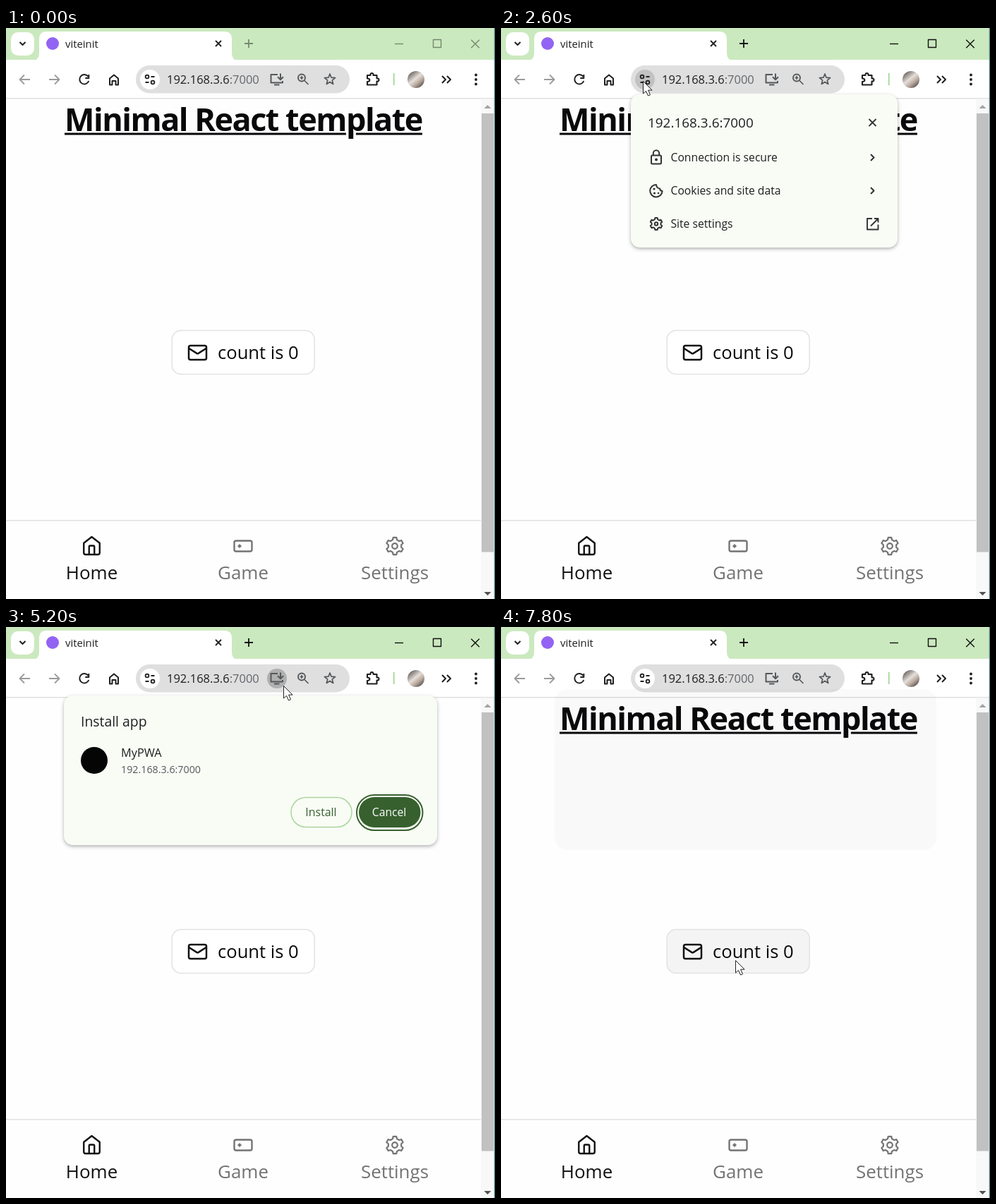
These frames come from a looping animation (693x809 px, 8000 ms). An HTML page with a canvas:

```html
<!DOCTYPE html>
<html lang="en">
<head>
<meta charset="utf-8">
<title>Minimal React template</title>
<style>
html, body { margin: 0; width: 100%; height: 100%; overflow: hidden; background: #fff; }
canvas { display: block; width: 693px; height: 809px; }
</style>
</head>
<body>
<canvas id="stage"></canvas>
<script>
const W = 693, H = 809, LOOP = 8000, STEP = 200;
const canvas = document.getElementById('stage');
const ctx = canvas.getContext('2d');
const dpr = window.devicePixelRatio || 1;
canvas.width = W * dpr;
canvas.height = H * dpr;

const INK = '#1f1f1f', GREEN = '#37602f', PANEL = '#f9fcf5', GREY = '#737373';
const HOST = '192.168.3.6:7000';

// [time, x, y] of the pointer tip
const POINTER = [
  [200, 660, 60], [400, 605, 85], [600, 375, 185], [800, 337, 208], [1000, 240, 140],
  [1200, 206, 80], [1600, 201, 75], [3800, 201, 75], [4600, 393, 83],
  [6200, 393, 83], [6400, 470, 200], [6600, 508, 250], [7200, 508, 250], [7800, 332, 472]
];

// Panel states: [from, opacity, vertical offset]
const SITE_PANEL = [[0, 0, 0], [2400, .5, -6], [2600, 1, 0], [3800, .9, -5], [4000, 0, 0]];
const APP_PANEL = [[0, 0, 0], [5000, .02, -17], [5200, 1, 0], [7000, .97, -4.5], [7200, 0, 0]];

const within = (t, a, b) => t >= a && t < b;
const stateAt = (list, t) => list.filter(s => s[0] <= t).pop();

function pointerAt(t) {
  const i = POINTER.findIndex(p => p[0] > t);
  if (i < 0) return POINTER[POINTER.length - 1].slice(1);
  const [t0, x0, y0] = POINTER[i - 1], [t1, x1, y1] = POINTER[i];
  const k = (t - t0) / (t1 - t0);
  return [x0 + (x1 - x0) * k, y0 + (y1 - y0) * k];
}

function rect(x, y, w, h, color) {
  ctx.fillStyle = color;
  ctx.fillRect(x, y, w, h);
}

function round(x, y, w, h, r, fill, stroke, lw = 1.5) {
  ctx.beginPath();
  ctx.roundRect(x, y, w, h, r);
  if (fill) { ctx.fillStyle = fill; ctx.fill(); }
  if (stroke) { ctx.strokeStyle = stroke; ctx.lineWidth = lw; ctx.stroke(); }
}

function disc(x, y, r, fill) {
  ctx.beginPath();
  ctx.arc(x, y, r, 0, Math.PI * 2);
  ctx.fillStyle = fill;
  ctx.fill();
}

function ring(x, y, r, color, lw) {
  ctx.beginPath();
  ctx.arc(x, y, r, 0, Math.PI * 2);
  ctx.strokeStyle = color;
  ctx.lineWidth = lw;
  ctx.stroke();
}

function line(d, color = INK, lw = 2) {
  ctx.strokeStyle = color;
  ctx.lineWidth = lw;
  ctx.stroke(new Path2D(d));
}

function shape(d, color) {
  ctx.fillStyle = color;
  ctx.fill(new Path2D(d));
}

function text(s, x, y, size, color = INK, align = 'left', weight = 400) {
  ctx.font = `${weight} ${size}px "Open Sans", "Noto Sans", sans-serif`;
  ctx.textAlign = align;
  ctx.fillStyle = color;
  ctx.fillText(s, x, y);
}

const cross = (x, y, r, color, lw) =>
  line(`M${x - r} ${y - r}l${2 * r} ${2 * r}M${x + r} ${y - r}l${-2 * r} ${2 * r}`, color, lw);

// Icon on a 24-unit grid, centred at x, y
function icon(x, y, scale, draw) {
  ctx.save();
  ctx.translate(x, y);
  ctx.scale(scale, scale);
  ctx.translate(-12, -12);
  draw();
  ctx.restore();
}

function gear(x, y, r, color, lw, hole) {
  ctx.beginPath();
  for (let i = 0; i < 6; i++) {
    for (const [turn, k] of [[-.33, .76], [-.19, 1], [.19, 1], [.33, .76]]) {
      const a = i * Math.PI / 3 - Math.PI / 2 + turn;
      ctx.lineTo(x + r * k * Math.cos(a), y + r * k * Math.sin(a));
    }
  }
  ctx.closePath();
  ctx.strokeStyle = color;
  ctx.lineWidth = lw;
  ctx.stroke();
  ring(x, y, hole, color, lw);
}

function tabStrip(active) {
  const color = active ? '#111' : '#75886f';
  rect(0, 0, W, 46, '#cbe9bf');
  round(7, 6, 33, 33, 10, '#fff');
  line('M19.5 20l4 4 4-4', INK, 2);
  shape('M37 46Q47 46 47 36V16Q47 5 58 5H309Q320 5 320 16V36Q320 46 330 46Z', '#fff');
  disc(66, 22, 9, '#9363f3');
  text('viteinit', 84, 28, 14.9);
  cross(301, 22, 4, INK, 1.8);
  line('M338 22h12M344 16v12', color, 1.8);
  line('M551 22.5h12', color, 1.4);
  ctx.strokeStyle = color;
  ctx.strokeRect(605.5, 16.5, 11, 11);
  cross(665, 22.5, 5.8, color, 1.4);
}

function avatar() {
  const g = ctx.createLinearGradient(572, 62, 590, 84);
  g.addColorStop(0, '#5d5551');
  g.addColorStop(.45, '#e6dfda');
  g.addColorStop(.7, '#b7a79c');
  g.addColorStop(1, '#4c4542');
  disc(581, 73, 12, g);
}

function toolbar(t) {
  rect(0, 45, W, 55, '#fff');
  rect(0, 99, W, 1.5, '#e0e0e0');
  line('M34 73H20M26 66.5L19.5 73L26 79.5', '#9b9b9b', 1.8);
  line('M61 73H75M69 66.5L75.5 73L69 79.5', '#9b9b9b', 1.8);
  line('M116.5 69A6.7 6.7 0 1 0 117.3 75', INK, 2);
  line('M117.3 66v5h-5', INK, 2);
  line('M147 71.5L153 66.5L159 71.5V80.5H155.5V75H150.5V80.5H147Z', INK, 2);

  round(184, 53, 303, 39.5, 19.7, '#dfdfdf');
  const tune = within(t, 2400, 4000) ? '#c2c2c2' : within(t, 1200, 4200) ? '#e5e5e5' : '#fff';
  disc(204, 73, 14, tune);
  ring(200, 69, 2.4, INK, 1.8);
  line('M205.5 69h5M197.5 77h5', INK, 1.8);
  ring(208, 77, 2.4, INK, 1.8);
  text('192.168.3.6', 228, 78.5, 16.5);
  const hostWidth = ctx.measureText('192.168.3.6').width;
  text(':7000', 228 + hostWidth, 78.5, 16.5, '#62666a');

  if (within(t, 4400, 7200)) disc(384, 73, 14, t < 4800 ? '#cbcbcb' : '#b0b0b0');
  const c = '#55585b';
  line('M385 66H375.5V77.5H392V75M380 80.5H387.5', c, 2);
  line('M389 64.5V72M385 69.2l4 4 4-4', c, 2);
  ring(419, 70.5, 5, c, 1.9);
  line('M423 74.5l5.5 5.5M416.6 70.5h4.8M419 68.1v4.8', c, 1.7);
  star(459, 73, 8, c);

  line('M512 67H516.5C515.5 63 521.5 63 520.5 67H525.5V71.5C529.5 70.5 529.5 76.5 525.5 75.5V80.5H512V76C516.5 76.5 516.5 71 512 71.5Z', INK, 2.1);
  rect(548.7, 64, 2, 17, '#a9dba0');
  avatar();
  line('M618 68l5 5-5 5M625 68l5 5-5 5', INK, 2);
  for (const y of [66.5, 73, 79.5]) disc(666, y, 1.9, INK);
}

function star(x, y, r, color) {
  ctx.beginPath();
  for (let i = 0; i < 10; i++) {
    const a = i * Math.PI / 5 - Math.PI / 2, k = i % 2 ? r * .43 : r;
    ctx.lineTo(x + k * Math.cos(a), y + k * Math.sin(a));
  }
  ctx.closePath();
  ctx.strokeStyle = color;
  ctx.lineWidth = 1.7;
  ctx.stroke();
}

function heading() {
  const x = 83, size = 45, black = '#09090b';
  ctx.letterSpacing = '-1.5px';
  text('Minimal React template', x, 146, size, black, 'left', 700);
  const width = ctx.measureText('Minimal React template').width;
  const p = x + ctx.measureText('Minimal React tem').width;
  ctx.letterSpacing = '0px';
  // The underline skips the descender
  rect(x, 148.5, p - x, 3, black);
  rect(p + 14, 148.5, x + width - p - 14, 3, black);
}

function counter(t) {
  round(235.2, 428.5, 202, 62, 13, t >= 7800 ? '#f4f4f5' : '#fff', '#e2e2e5');
  icon(271.5, 460, 1.25, () => {
    line('M4 4H20A2 2 0 0 1 22 6V18A2 2 0 0 1 20 20H4A2 2 0 0 1 2 18V6A2 2 0 0 1 4 4Z', '#111', 2);
    line('M22 7L13 12.7a1.94 1.94 0 0 1-2 0L2 7', '#111', 2);
  });
  text('count is 0', 300, 468.5, 25.6, '#09090b');
  const caret = within(t, 600, 1200) || within(t, 1600, 2200) || within(t, 4000, 4600) || within(t, 7000, 7600);
  if (caret) rect(299.6, 444, 1.5, 31, '#000');
}

function navigation() {
  rect(0, 697, 673, 1.5, '#e2e2e5');
  icon(121.5, 733.5, 1.25, () => {
    line('M3 9L12 2L21 9V20A2 2 0 0 1 19 22H5A2 2 0 0 1 3 20Z', '#111', 1.9);
    line('M9 22V13a1 1 0 0 1 1-1h4a1 1 0 0 1 1 1V22', '#111', 1.9);
  });
  icon(336, 734, 1.25, () => {
    line('M4 6H20A2 2 0 0 1 22 8V16A2 2 0 0 1 20 18H4A2 2 0 0 1 2 16V8A2 2 0 0 1 4 6Z', GREY, 1.9);
    line('M6 12h4M8 10v4M15 13h.01M18 11h.01', GREY, 1.9);
  });
  gear(551, 734, 12.3, GREY, 2.2, 3.8);
  text('Home', 121.5, 781, 25.9, '#111', 'center');
  text('Game', 336, 781, 25.9, GREY, 'center');
  text('Settings', 551, 781, 25.9, GREY, 'center');
}

function scrollbar() {
  rect(673, 100.5, 19, H, '#f8f8f8');
  rect(674, 121, 17, 621.5, '#c1c1c1');
  shape('M677.5 114l5-5 5 5Z', '#a3a3a3');
  shape('M677.5 799l5 5 5-5Z', '#505050');
  rect(691.8, 0, 1.2, H, '#4b8587');
}

function panel(x, y, w, h) {
  ctx.save();
  ctx.shadowColor = 'rgba(0,0,0,.3)';
  ctx.shadowBlur = 5 * dpr;
  ctx.shadowOffsetY = 2 * dpr;
  round(x, y, w, h, 13, PANEL);
  ctx.restore();
}

function withState([, alpha, dy], draw) {
  if (!alpha) return;
  ctx.save();
  ctx.globalAlpha = alpha;
  ctx.translate(0, dy);
  draw();
  ctx.restore();
}

function sitePanel() {
  const c = '#333';
  panel(184, 94, 378, 217);
  text(HOST, 208, 141, 18.9);
  cross(526.5, 134, 5, c, 1.8);
  ['Connection is secure', 'Cookies and site data', 'Site settings'].forEach((label, i) => {
    const y = 183.5 + i * 47;
    text(label, 240.5, y + 5.5, 15.7);
    if (i < 2) line(`M524 ${y - 4.5}l4.5 4.5-4.5 4.5`, c, 2);
  });
  round(213, 180.5, 14, 12, 1.5, null, c, 2);
  line('M215.8 180V177.5a4.2 4.2 0 0 1 8.4 0V180', c, 2);
  disc(220, 186.5, 2, c);
  line('M220 222A8.7 8.7 0 1 0 228.6 231Q225.5 231 225 227.5Q220.5 227 220 222Z', c, 2);
  for (const [x, y, r] of [[217, 228, 1.6], [217.5, 234, 1.6], [223, 234, 1.3]]) disc(x, y, r, c);
  gear(220, 277.5, 8.7, c, 2, 2.2);
  line('M526 270H519V285.5H534.5V278.5M529 270H534.5V275.5M534 270.5L524 280.5', c, 1.9);
}

function appPanel(focused) {
  panel(82, 97, 529, 212);
  text('Install app', 106, 141, 19.4);
  disc(125, 189, 19, '#050505');
  text('MyPWA', 163, 184, 16.3);
  text(HOST, 163, 207, 14.25, '#55585b');
  round(404, 241.5, 86, 42, 21, null, '#a9d69c');
  text('Install', 446.5, 268, 15.9, GREEN, 'center');
  if (focused) round(497, 238, 93.5, 50, 25, null, GREEN, 2);
  round(500, 241, 87.5, 43, 21.5, GREEN);
  text('Cancel', 543, 268, 15.7, '#fff', 'center');
}

function tooltip() {
  rect(402, 100, 118, 30, '#fcfcfc');
  line('M402.5 130V100.5H519.5V130', '#777', 1);
  text('Install MyPWA', 411, 121, 14.9, '#444');
}

function pointer(x, y) {
  const path = new Path2D('M0 0V17.5L4 13.8L7 20.5L10 19.2L7.1 12.6H12.6Z');
  ctx.save();
  ctx.translate(x + .5, y + .5);
  ctx.fillStyle = '#fff';
  ctx.fill(path);
  ctx.strokeStyle = '#222';
  ctx.lineWidth = 1;
  ctx.stroke(path);
  ctx.restore();
}

function draw(t) {
  ctx.setTransform(dpr, 0, 0, dpr, 0, 0);
  ctx.lineCap = 'butt';
  ctx.lineJoin = 'round';
  rect(0, 0, W, H, '#fefefe');
  tabStrip(t >= 200);
  toolbar(t);
  heading();
  counter(t);
  navigation();
  scrollbar();

  // Last trace of a closing panel
  if (within(t, 4000, 5200)) round(177, 90, 391, 228, 18, 'rgba(0,0,0,.018)');
  if (t >= 7200) round(76, 88, 541, 228, 18, 'rgba(0,0,0,.018)');

  withState(stateAt(SITE_PANEL, t), sitePanel);
  withState(stateAt(APP_PANEL, t), () => appPanel(t < 7000));
  if (within(t, 5600, 6400)) tooltip();
  if (t >= 200) pointer(...pointerAt(t));
}

function frame(now) {
  draw(Math.floor(now % LOOP / STEP) * STEP);
  requestAnimationFrame(frame);
}
draw(0);
requestAnimationFrame(frame);
</script>
</body>
</html>
```
